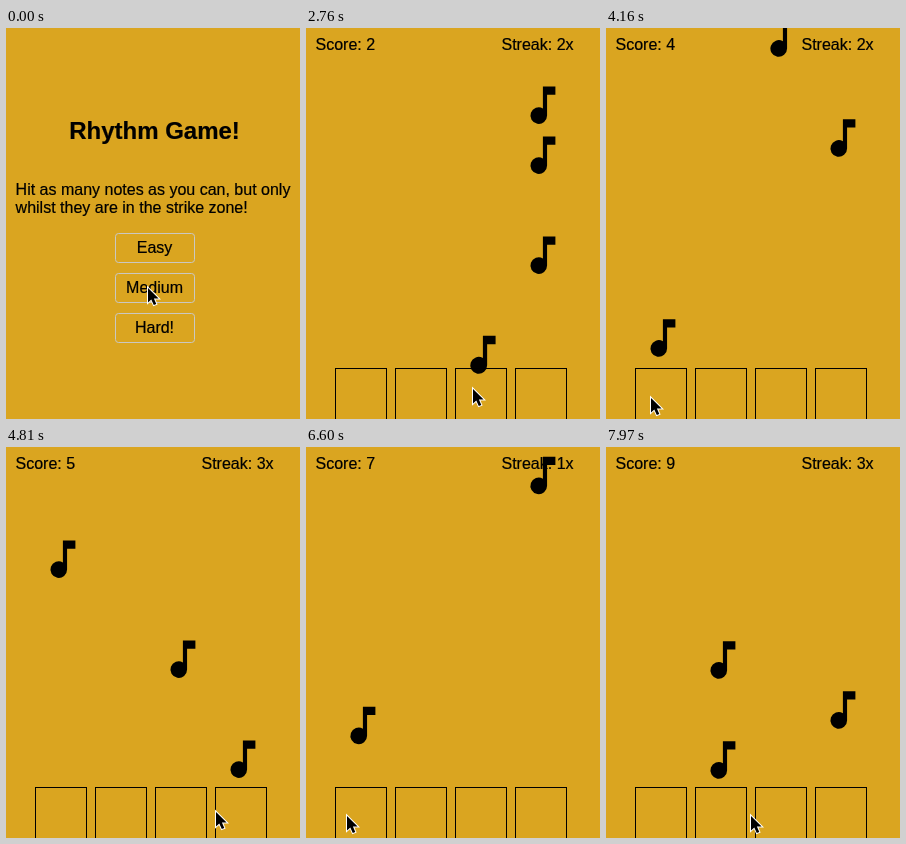
An HTML page for the animation above (8000 ms loop, 294x391 px).

```html
<!DOCTYPE html>
<html lang="en">
<head>
<meta charset="utf-8">
<title>Rhythm Game</title>
<style>
  html, body { margin: 0; width: 100%; height: 100%; overflow: hidden; background: #daa520; }
  svg { display: block; width: 294px; height: 391px; background: #daa520; }
  text { font: 16px "Liberation Sans", Arial, sans-serif; white-space: pre; stroke: #000; stroke-width: .2px; }
  .title { font-size: 24px; font-weight: bold; }
  .mid { text-anchor: middle; }
  .box { fill: none; stroke: #000; }
  .btn { fill: none; stroke: #cac8c2; }
  #cursor { stroke: #fff; stroke-width: 2px; paint-order: stroke; }
</style>
</head>
<body>
<svg viewBox="0 0 294 391">
  <g id="menu">
    <text class="title mid" x="148.5" y="111">Rhythm Game!</text>
    <text x="9.6" y="167">Hit as many notes as you can, but only</text>
    <text x="9.6" y="185">whilst they are in the strike zone!</text>
  </g>
  <g id="game">
    <text id="score" x="9.5" y="22"></text>
    <text id="streak" x="195.5" y="22"></text>
    <g id="lanes"></g>
    <g id="notes"></g>
  </g>
  <path id="cursor" d="M0 0V14.5L3.3 11.4 5.8 17 8.3 15.9 5.9 10.5H10.6Z"/>
</svg>
<script>
const LOOP = 8000, START = 500;
const STEP = 50, STRIKE = 308, FADE = 58;

// One character per step: lanes a to d, capitals are missed
const SONG = 'c.c.D.dd...a...d.C.A...d...a....d..bdb';

// Cursor moves: [start, x, y]
const MOVE = 400, HOME = [142, 260];
const MOVES = [
  [900, 167, 361], [2800, 230, 371], [3700, 45, 370], [4270, 210, 365],
  [6150, 41, 369], [6900, 228, 370], [7570, 145, 369]
];

const $ = id => document.getElementById(id);
const unit = p => Math.min(1, Math.max(0, p));

function add(parent, tag, attrs, text = '') {
  const el = document.createElementNS('http://www.w3.org/2000/svg', tag);
  for (const k in attrs) el.setAttribute(k, attrs[k]);
  el.textContent = text;
  parent.append(el);
  return el;
}

['Easy', 'Medium', 'Hard!'].forEach((label, i) => {
  const y = 205 + i * 40;
  add($('menu'), 'rect', { class: 'btn', x: 109.5, y: y + .5, width: 79, height: 29, rx: 3 });
  add($('menu'), 'text', { class: 'mid', x: 148.5, y: y + 20 }, label);
});

for (let i = 0; i < 4; i++)
  add($('lanes'), 'rect', { class: 'box', x: 29.5 + i * 60, y: 340.5, width: 51, height: 60 });

// Note shape centred on the origin, 25 by 37.5
const SHAPE = 'M0-18.75V3.23A8.33 8.33 0 1 0 4.17 10.42V-10.42H12.5V-18.75Z';
const notes = [...SONG].flatMap((c, i) => c === '.' ? [] : {
  x: 56.9 + 'abcd'.indexOf(c.toLowerCase()) * 60,
  offset: 168 - i * STEP,
  missed: c < 'a',
  el: add($('notes'), 'path', { d: SHAPE })
});

// Steady fall with a slight slow drift
function fallen(t) {
  const u = t - 1990;
  return u * .31371 - 9.7 * Math.sin(Math.PI * u / 6140) ** 2;
}

// A struck note stops, grows and fades
function drawNote(n, fall) {
  const y = n.offset + fall;
  const p = n.missed ? 0 : unit((y - STRIKE) / FADE);
  const top = n.missed ? y : Math.min(y, STRIKE);
  n.el.setAttribute('transform', `translate(${n.x} ${top + 18.75}) scale(${2 - (1 - p) ** 2})`);
  n.el.setAttribute('opacity', 1 - p);
}

function drawCursor(t) {
  let [x, y] = HOME;
  for (const [start, toX, toY] of MOVES) {
    const p = unit((t - start) / MOVE);
    const ease = p * p * (3 - 2 * p);
    x += (toX - x) * ease;
    y += (toY - y) * ease;
  }
  $('cursor').setAttribute('transform', `translate(${x} ${y})`);
}

// The streak is the run of hits that ends with the latest one
function drawCounters(fall) {
  let score = 0, streak = 0, run = 0;
  for (const n of notes) {
    if (n.offset + fall < STRIKE) break;
    if (n.missed) run = 0;
    else { score++; streak = ++run; }
  }
  $('score').textContent = 'Score: ' + score;
  $('streak').textContent = `Streak: ${streak}x`;
}

function draw(t) {
  const playing = t >= START, fall = fallen(t);
  $('menu').style.display = playing ? 'none' : '';
  $('game').style.display = playing ? '' : 'none';
  notes.forEach(n => drawNote(n, fall));
  drawCounters(fall);
  drawCursor(t);
}

const begin = performance.now();
function tick() {
  draw((performance.now() - begin) % LOOP);
  requestAnimationFrame(tick);
}
tick();
</script>
</body>
</html>
```
